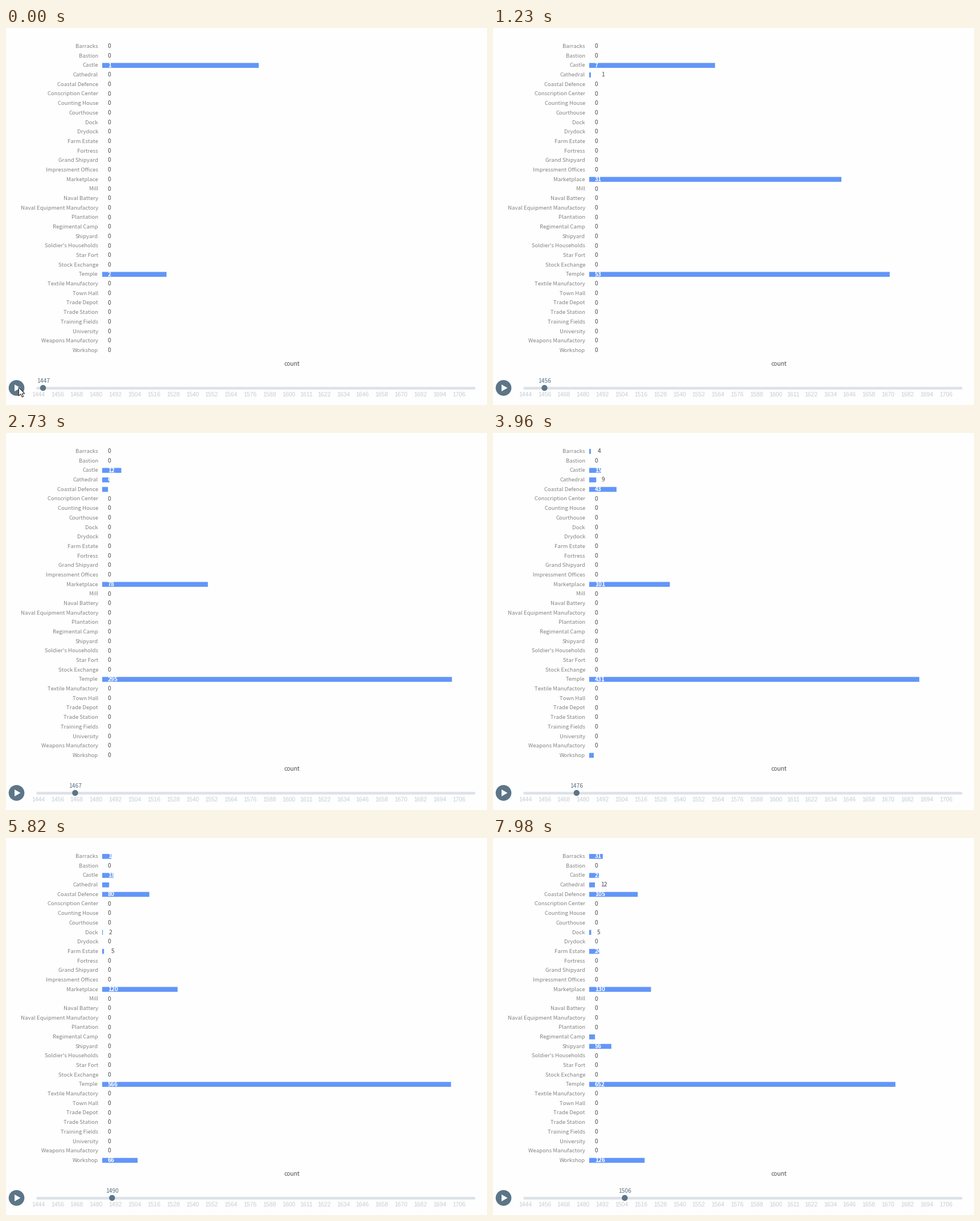
A matplotlib script for the animation above (8 s loop, 845 by 662 pixels).

```python
import math

import numpy as np
import matplotlib.pyplot as plt
from matplotlib.animation import FuncAnimation
from matplotlib.patches import Circle, Polygon, Rectangle

W, H, DPI = 845, 662, 64
LOOP, INTERVAL = 8000, 40
YEAR_MS, FIRST_YEAR, YEARS = 135.25, 1447, 60
LEFT, AXIS_WIDTH, ROW_STEP = 169, 666, 16.68
EASE = 0.27          # share of the remaining way a bar covers per year
ONSET = 1.2          # years over which building activity sets in
MIN_INSIDE = 12      # narrower bars carry their label outside

BLUE, SLATE, RAIL = "#6296f8", "#5c7587", "#dce2e7"
GRAY, DARK, PALE = "#858585", "#4c4c4c", "#c5ced6"
SANS, ARIAL = "Noto Sans CJK JP", "Liberation Sans"

NAMES = [
    "Barracks", "Bastion", "Castle", "Cathedral", "Coastal Defence",
    "Conscription Center", "Counting House", "Courthouse", "Dock", "Drydock",
    "Farm Estate", "Fortress", "Grand Shipyard", "Impressment Offices",
    "Marketplace", "Mill", "Naval Battery", "Naval Equipment Manufactory",
    "Plantation", "Regimental Camp", "Shipyard", "Soldier's Households",
    "Star Fort", "Stock Exchange", "Temple", "Textile Manufactory",
    "Town Hall", "Trade Depot", "Trade Station", "Training Fields",
    "University", "Weapons Manufactory", "Workshop",
]

# Saturating growth: start year, ceiling, time constant, initial stock
GROWTH = {
    "Barracks": (24.5, 196, 200),
    "Castle": (-2, 25.4, 34),
    "Cathedral": (8, 13.1, 16),
    "Coastal Defence": (18, 142, 30),
    "Dock": (34, 14.8, 60),
    "Farm Estate": (38.5, 255, 200),
    "Marketplace": (4.3, 138, 18.5),
    "Regimental Camp": (45, 230, 200),
    "Shipyard": (45.6, 137, 25),
    "Temple": (7.5, 745, 25, 2),
    "Workshop": (26, 1600, 400),
}
OPENING = {"Castle": 275, "Temple": 113}   # bars already under way


def grow(start, ceiling, tau, initial=0):
    age = ONSET * np.log1p(np.exp((np.arange(YEARS) - start) / ONSET))
    return np.floor(initial + ceiling * (1 - np.exp(-age / tau))).astype(int)


def axis_limit(top):
    """Round the axis end up to a multiple of a nice interval."""
    raw = top / 4
    unit = 10 ** math.floor(math.log10(raw))
    share = raw / unit
    nice = next((n for edge, n in ((1.5, 1), (2.5, 2), (4, 3), (7, 5)) if share < edge), 10)
    return math.ceil(top / (nice * unit) - 1e-9) * nice * unit


def chase(goal, length):
    """Bar length per year while it keeps easing towards a moving goal."""
    path = [length]
    for aim in goal[1:]:
        path.append(path[-1] + EASE * (aim - path[-1]))
    return path


counts = {name: grow(*rule) for name, rule in GROWTH.items()}
limits = np.array([axis_limit(top) for top in np.max(list(counts.values()), axis=0)])
targets = {name: c / limits * AXIS_WIDTH for name, c in counts.items()}
lengths = {name: chase(t, OPENING.get(name, 0)) for name, t in targets.items()}

fig = plt.figure(figsize=(W / DPI, H / DPI), dpi=DPI, facecolor="#fefefe")
ax = fig.add_axes([0, 0, 1, 1])
ax.set_xlim(0, W)
ax.set_ylim(H, 0)
ax.axis("off")


def write(x, y, text, size, color, ha="center", font=SANS):
    return ax.text(x, y, text, fontsize=size * 72 / DPI, color=color, ha=ha,
                   va="baseline", family=font, zorder=4)


def shape(patch, z=2):
    patch.set_zorder(z)
    return ax.add_patch(patch)


def year_x(year):
    return 56.6 + 2.82 * (year - 1444)


bars, labels = {}, {}
for row, name in enumerate(NAMES):
    y = 31.7 + ROW_STEP * row
    write(162, y + 3.4, name, 9.6, GRAY, "right")
    labels[name] = write(LEFT + 9.8, y + 3.6, "0", 10.2, DARK, "left")
    if name in GROWTH:
        bars[name] = shape(Rectangle((LEFT, y - 3.7), 0, 8.6, color=BLUE, lw=0, snap=False))

write(502, 593.3, "count", 10.2, DARK)

ax.plot([55, 821.7], [632, 632], color=RAIL, lw=4.6 * 72 / DPI,
        solid_capstyle="round", zorder=1)
for year in [*range(1444, 1601, 12), 1611, *range(1622, 1707, 12)]:
    write(year_x(year), 647, str(year), 10.4, PALE, font=ARIAL)

shape(Circle((18.5, 632), 13.8, color=SLATE, lw=0))
shape(Polygon([(15, 626), (25.5, 632), (15, 638)], color="white", lw=0), 3)
handle = shape(Circle((0, 632), 5.2, color=SLATE, lw=0), 3)
year_label = write(0, 622.8, "", 10.2, SLATE)

arrow = [(0, 0), (0, 15), (3.5, 11.8), (6, 17), (8.3, 16), (6, 11), (10.5, 11)]
cursor = shape(Polygon([(22.3 + x, 631 + y) for x, y in arrow],
                       fc="white", ec="black", lw=1), 6)


def update(frame):
    k = min(int((frame * INTERVAL + 30) / YEAR_MS), YEARS - 1)
    for name, bar in bars.items():
        count, goal, label = counts[name][k], targets[name][k], labels[name]
        inside = goal >= MIN_INSIDE
        bar.set_width(lengths[name][k])
        label.set_text(str(count))
        label.set_color("white" if inside else DARK)
        label.set_fontweight("bold" if inside else "normal")
        label.set_x(LEFT + 9.8 + (0 if inside else goal))
    x, year = year_x(FIRST_YEAR + k), FIRST_YEAR + k
    handle.center = (x, 632)
    year_label.set_x(x)
    year_label.set_text(str(year))
    cursor.set_visible(k == 0)
    return [*bars.values(), *labels.values(), handle, year_label, cursor]


animation = FuncAnimation(fig, update, frames=LOOP // INTERVAL, interval=INTERVAL,
                          repeat=True, repeat_delay=0, blit=False)
plt.show()
```
